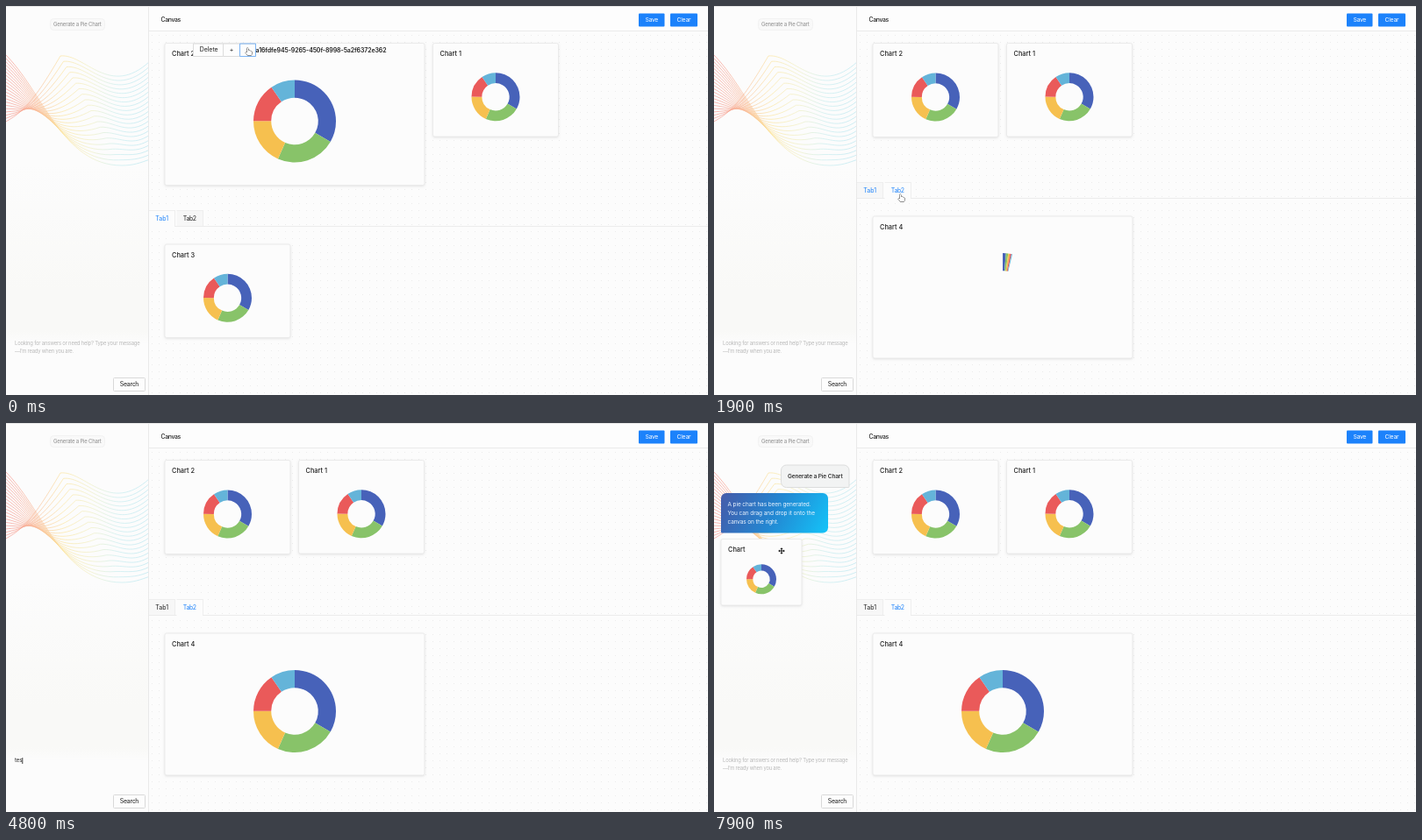
Write an HTML page with a canvas that moves like this. It is 800 by 444 pixels and loops after 8 s.

```html
<!DOCTYPE html>
<html lang="en">
<head>
<meta charset="utf-8">
<title>Chart canvas</title>
<style>
html, body { margin: 0; width: 100%; height: 100%; overflow: hidden; background: #fcfcfc; }
canvas { display: block; width: 800px; height: 444px; }
</style>
</head>
<body>
<canvas id="stage"></canvas>
<script>
const LOOP = 8000;
const cv = document.getElementById('stage');
const dpr = window.devicePixelRatio || 1;
cv.width = 800 * dpr;
cv.height = 444 * dpr;
const c = cv.getContext('2d');
const FONT = 'Inter, "Open Sans", sans-serif';
const BLUE = '#1c82fb';
const INK = '#1f1f1f';
const PIE = [[1048, '#4762b9'], [735, '#88c369'], [580, '#f6c04f'], [484, '#ea5a5a'], [300, '#64b4d9']];
const TOTAL = PIE.reduce((s, p) => s + p[0], 0);

const clamp = v => Math.max(0, Math.min(1, v));
const mix = (a, b, k) => a + (b - a) * k;
const span = (t, a, b) => clamp((t - a) / (b - a));
const easeOut = k => 1 - (1 - k) ** 3;
const easeInOut = k => k < .5 ? 4 * k ** 3 : 1 - (2 - 2 * k) ** 3 / 2;

function text(s, x, y, size, color = INK, weight = 400, width) {
  c.font = `${weight} ${size}px ${FONT}`;
  c.fillStyle = color;
  // letter spacing is chosen so a line keeps its natural proportions
  c.letterSpacing = '0px';
  if (width) c.letterSpacing = (width - c.measureText(s).width) / s.length + 'px';
  c.fillText(s, x, y);
  c.letterSpacing = '0px';
}

function rect(x, y, w, h, color) {
  c.fillStyle = color;
  c.fillRect(x, y, w, h);
}

function box(x, y, w, h, r, fill, stroke) {
  c.beginPath();
  c.roundRect(x, y, w, h, r);
  c.fillStyle = fill;
  c.fill();
  if (stroke) {
    c.strokeStyle = stroke;
    c.lineWidth = 1;
    c.stroke();
  }
}

function pie(x, y, r, grow = 1) {
  let a = -Math.PI / 2;
  for (const [value, color] of PIE) {
    const b = a + value / TOTAL * Math.PI * 2 * grow;
    c.beginPath();
    c.arc(x, y, r, a, b);
    c.arc(x, y, r * .57, b, a, true);
    c.closePath();
    c.fillStyle = color;
    c.fill();
    a = b;
  }
}

function card(title, x, y, w, h, r, grow) {
  c.save();
  c.shadowColor = 'rgba(0,0,0,.12)';
  c.shadowBlur = 3 * dpr;
  c.shadowOffsetY = dpr;
  box(x, y, w, h, 2, '#fcfcfc');
  c.restore();
  box(x, y, w, h, 2, '#fcfcfc', '#ebebeb');
  text(title, x + 8, y + 14.7, 7.4, INK, 500);
  pie(x + w / 2, y + h / 2 + (r < 20 ? 8 : 8), r, grow);
}

function waves() {
  const g = c.createLinearGradient(0, 0, 162, 0);
  g.addColorStop(0, '#f58c86');
  g.addColorStop(.2, '#f9b795');
  g.addColorStop(.4, '#fbe39a');
  g.addColorStop(.6, '#efeec0');
  g.addColorStop(.78, '#c5ecee');
  g.addColorStop(1, '#b3e4ee');
  c.save();
  c.beginPath();
  c.rect(0, 40, 162, 160);
  c.clip();
  c.strokeStyle = g;
  c.lineWidth = .65;
  const n = 20;
  for (let i = 0; i <= n; i++) {
    const k = i / n;
    c.beginPath();
    // each strand runs between a high early crest and a low late one
    c.moveTo(-2, mix(54, 133, k));
    c.bezierCurveTo(mix(42, 18, k), mix(97, 122, k), mix(64, 30, k), mix(182, 112, k),
      mix(132, 62, k), mix(182, 57, k));
    c.bezierCurveTo(mix(145, 90, k), mix(182, 54, k), mix(153, 118, k), mix(179, 106, k),
      164, mix(175, 63, k));
    c.stroke();
  }
  c.restore();
}

function sidebar() {
  const g = c.createLinearGradient(0, 180, 0, 444);
  g.addColorStop(0, '#fcfcfc');
  g.addColorStop(.55, '#f9f9f7');
  g.addColorStop(.72, '#f9f9f7');
  g.addColorStop(.78, '#fcfcfc');
  g.addColorStop(1, '#fcfcfc');
  rect(0, 0, 162, 444, g);
  waves();
  box(50.5, 14.5, 62, 13, 4, '#f9f9f9', '#f2f2f2');
  text('Generate a Pie Chart', 54, 23.1, 6, '#8c8c8c', 400, 54.5);
}

function composer(t) {
  const typed = t < 4300 || t >= 5600 ? '' : 'test'.slice(0, t < 4500 ? 1 : t < 4800 ? 2 : t < 4900 ? 3 : 4);
  if (typed) {
    text(typed, 10, 387.4, 5.9);
  } else {
    text('Looking for answers or need help? Type your message', 10, 387.4, 5.9, '#b9b9b9', 400, 142.5);
    text('—I’m ready when you are.', 10, 396, 5.9, '#b9b9b9', 400, 67);
  }
  const since = t < 5600 ? t - 3600 : t - 6100;
  const typing = t >= 4300 && t < 5200;
  if (t >= 3600 && (typing || ((since % 1000) + 1000) % 1000 < 500)) {
    c.font = `400 5.9px ${FONT}`;
    rect(10 + c.measureText(typed).width, 382, .8, 7, '#111');
  }
  box(122.5, 424.5, 36, 15, 1, '#fdfdfd', '#d9d9d9');
  text('Search', 129.8, 434.4, 7, INK, 400, 21.4);
}

function bubble(s, x, y, w, h) {
  box(x, y, w, h, [6, 6, 1, 6], '#f2f3f3', '#dcdddd');
  text(s, x + 7.5, y + h / 2 + 2.4, 6.6, '#222', 500, w - 15);
}

function spinner(t) {
  const turn = (t - 6200) / 1200 * Math.PI * 2 + .28;
  for (let i = 0; i < 4; i++) {
    const a = turn + Math.PI / 4 + i * Math.PI / 2;
    const wave = .5 + .5 * Math.cos((t - 6200) / 1000 * Math.PI - i * 1.25);
    c.globalAlpha = .35 + .65 * wave;
    c.beginPath();
    c.arc(81 + Math.cos(a) * 3.9, 86 + Math.sin(a) * 3.9, 1.75, 0, 7);
    c.fillStyle = '#3c86d8';
    c.fill();
  }
  c.globalAlpha = 1;
}

function chat(t) {
  if (t < 5600) return;
  if (t < 6700) {
    bubble('test', 127.5, 48, 26.5, 25.5);
    spinner(t);
    return;
  }
  bubble('Generate a Pie Chart', 76.5, 48, 77.5, 25.5);
  const g = c.createLinearGradient(8, 70, 130, 135);
  g.addColorStop(0, '#4a5aa8');
  g.addColorStop(.15, '#3d64b2');
  g.addColorStop(.5, '#2387d2');
  g.addColorStop(1, '#13c8fb');
  box(8, 80, 122, 45.5, [6, 6, 6, 1], g);
  text('A pie chart has been generated.', 15.5, 95, 6.5, '#eaf4ff', 400, 95);
  text('You can drag and drop it onto the', 15.5, 105.2, 6.5, '#eaf4ff', 400, 99.5);
  text('canvas on the right.', 15.5, 115.4, 6.5, '#eaf4ff', 400, 58);
  card('Chart', 8, 132.5, 92, 75.5, 17, easeInOut(span(t, 6700, 7700)));
}

function header() {
  rect(163, 1, 637, 27, '#fdfdfd');
  rect(163, 28, 637, 1, '#ebebeb');
  text('Canvas', 176.5, 18.2, 6.9, INK, 500, 22.3);
  box(721, 8.5, 29.5, 15, 1, BLUE);
  text('Save', 728.5, 18.4, 6.8, '#fff', 400, 14.5);
  box(757, 8.5, 31, 15, 1, BLUE);
  text('Clear', 764.4, 18.4, 6.8, '#fff', 400, 16);
}

function dots() {
  c.fillStyle = '#ececec';
  for (let y = 33; y < 444; y += 8)
    for (let x = 166; x < 800; x += 8) c.fillRect(x, y, 1, 1);
}

function tabs(t, y) {
  const second = t >= 1700;
  rect(163, y + 18, 637, 1, '#ececec');
  const tab = (s, x, w, on, hot) => {
    rect(x, y, w, 18, on ? '#fcfcfc' : '#f7f7f7');
    rect(x, y, w, 1, '#eeeeee');
    rect(x + w - 1, y, 1, 18, '#eeeeee');
    if (!on) rect(x, y + 18, w, 1, '#ececec');
    else rect(x, y + 18, w - 1, 1, '#fcfcfc');
    text(s, x + 7.3, y + 11.7, 7, hot ? BLUE : INK, 400, 14.8);
  };
  tab('Tab1', 163, 30, !second, t < 2000);
  tab('Tab2', 194.5, 30.5, second, t >= 1500);
}

function toolbar(t) {
  if (t >= 850) return;
  const pressed = t >= 100;
  rect(213, 43, 72, 14.5, '#fdfdfd');
  const cell = (s, x, w, tx, off) => {
    box(x, 43, w, 14.5, 0, off ? '#f3f3f3' : '#fdfdfd', '#dcdcdc');
    text(s, tx, 52.4, 6.9, off ? '#b5b5b5' : INK);
  };
  cell('Delete', 213.5, 34, 220.7);
  cell('+', 247.5, 19, 254.7);
  cell('-', 266.5, 18, 274, pressed);
  if (!pressed) {
    box(266.5, 43, 18, 14.5, 0, 'rgba(255,255,255,0)', '#7db5f5');
    text('a16fdfe945-9265-450f-8998-5a2f6372e362', 284.5, 52.6, 7, INK, 600, 149);
  } else {
    text('a16fdfe945-9265-450f-8998-', 213.5, 65.3, 7, INK, 600, 100);
    text('5a2f6372e362', 213.5, 75.2, 7, INK, 600, 49.5);
  }
}

function tooltip(t) {
  const k = span(t, 300, 380) * (1 - span(t, 420, 650));
  if (k <= 0) return;
  c.save();
  c.globalAlpha = Math.min(.62, k);
  // the neighbouring card hides the tooltip's right side
  c.beginPath();
  c.rect(250, 100, 83.5, 36);
  c.clip();
  box(253, 104.5, 96, 27, 2, '#fff', '#4762b9');
  text('Access From', 257.5, 115, 7, '#777', 400, 40);
  c.beginPath();
  c.arc(260, 123.8, 2.5, 0, 7);
  c.fillStyle = '#4762b9';
  c.fill();
  text('Search Engine', 265, 126.2, 7, '#777', 400, 44);
  text('1,048', 317.5, 126.2, 7, '#666', 600);
  c.restore();
}

function board(t) {
  const k = easeOut(span(t, 80, 380));
  const w = mix(296, 143, k), h = mix(162, 107, k);
  const y = mix(232.5, 200.5, k);
  const r = t < 200 ? mix(47, 27.5, k) : 27.5;
  dots();
  header();
  card('Chart 2', 181, 42.5, w, h, r);
  tooltip(t);
  card('Chart 1', mix(486.5, 333.5, k), 42.5, 143, 106.5, 27.5);
  toolbar(t);
  tabs(t, Math.round(y));
  if (t < 1700) card('Chart 3', 181, y + 39.5, 143, 106.5, 27.5);
  else card('Chart 4', 181, 240, 296, 162, 47, easeInOut(span(t, 1690, 2690)));
}

// time, x, y of the pointer hot spot
const TRACK = [
  [0, 275, 48], [150, 275, 48], [500, 265, 173], [800, 265, 173], [1500, 212, 215],
  [2200, 212, 215], [3000, 49, 352], [3250, 49, 352], [3600, 44, 386], [4300, 44, 386],
  [6800, 44, 386], [7700, 77, 146], [8000, 77, 146]
];

function pointer(t) {
  if (t >= 4300 && t < 6900) return;
  let i = 0;
  while (i < TRACK.length - 2 && t >= TRACK[i + 1][0]) i++;
  const [ta, xa, ya] = TRACK[i], [tb, xb, yb] = TRACK[i + 1];
  let k = span(t, ta, tb);
  k = k * k * (3 - 2 * k);
  const x = mix(xa, xb, k), y = mix(ya, yb, k);
  c.save();
  c.translate(x, y);
  c.lineJoin = 'round';
  const onCard = x < 100 && y > 133 && y < 208;
  if (t < 200 || (t >= 1450 && t < 2350)) hand();
  else if ((t > 220 && t < 1250) || onCard) move();
  else if (t >= 3400 && t < 4300) beam();
  else arrow();
  c.restore();
}

function shape(d, fill, stroke) {
  const p = new Path2D(d);
  c.lineWidth = .8;
  c.strokeStyle = stroke;
  c.stroke(p);
  c.fillStyle = fill;
  c.fill(p);
}

function hand() {
  shape('M-.6 .2Q.3-.6 1 .5L1.6 3Q2.5 2.6 3 3.3Q4 3 4.3 3.8Q5.4 3.7 5.4 5Q5.4 7 4.4 8.3H.3Q-.8 6.7-2 5.2Q-1.8 4.2-.4 4.8L.1 4.9Z', '#fff', '#111');
}

function arrow() {
  shape('M0 0V6.4L1.5 5L2.5 7.4L3.6 6.9L2.6 4.6H4.6Z', '#000', '#fff');
}

function beam() {
  rect(-.4, -3.5, .8, 7, '#222');
  rect(-1.5, -3.8, 3, .7, '#222');
  rect(-1.5, 3.1, 3, .7, '#222');
}

function move() {
  const d = 'M0-3.8L1.6-2H.5V-.5H2V-1.6L3.8 0L2 1.6V.5H.5V2H1.6L0 3.8L-1.6 2H-.5V.5H-2V1.6L-3.8 0L-2-1.6V-.5H-.5V-2H-1.6Z';
  shape(d, '#111', '#fff');
}

function draw(t) {
  c.setTransform(dpr, 0, 0, dpr, 0, 0);
  rect(0, 0, 800, 444, '#fcfcfc');
  sidebar();
  composer(t);
  chat(t);
  board(t);
  rect(162, 0, 1, 444, '#e9e9e9');
  rect(0, 0, 800, 1, '#e6e6e6');
  pointer(t);
}

const start = performance.now();
function tick() {
  draw((performance.now() - start) % LOOP);
  requestAnimationFrame(tick);
}
tick();
</script>
</body>
</html>
```
